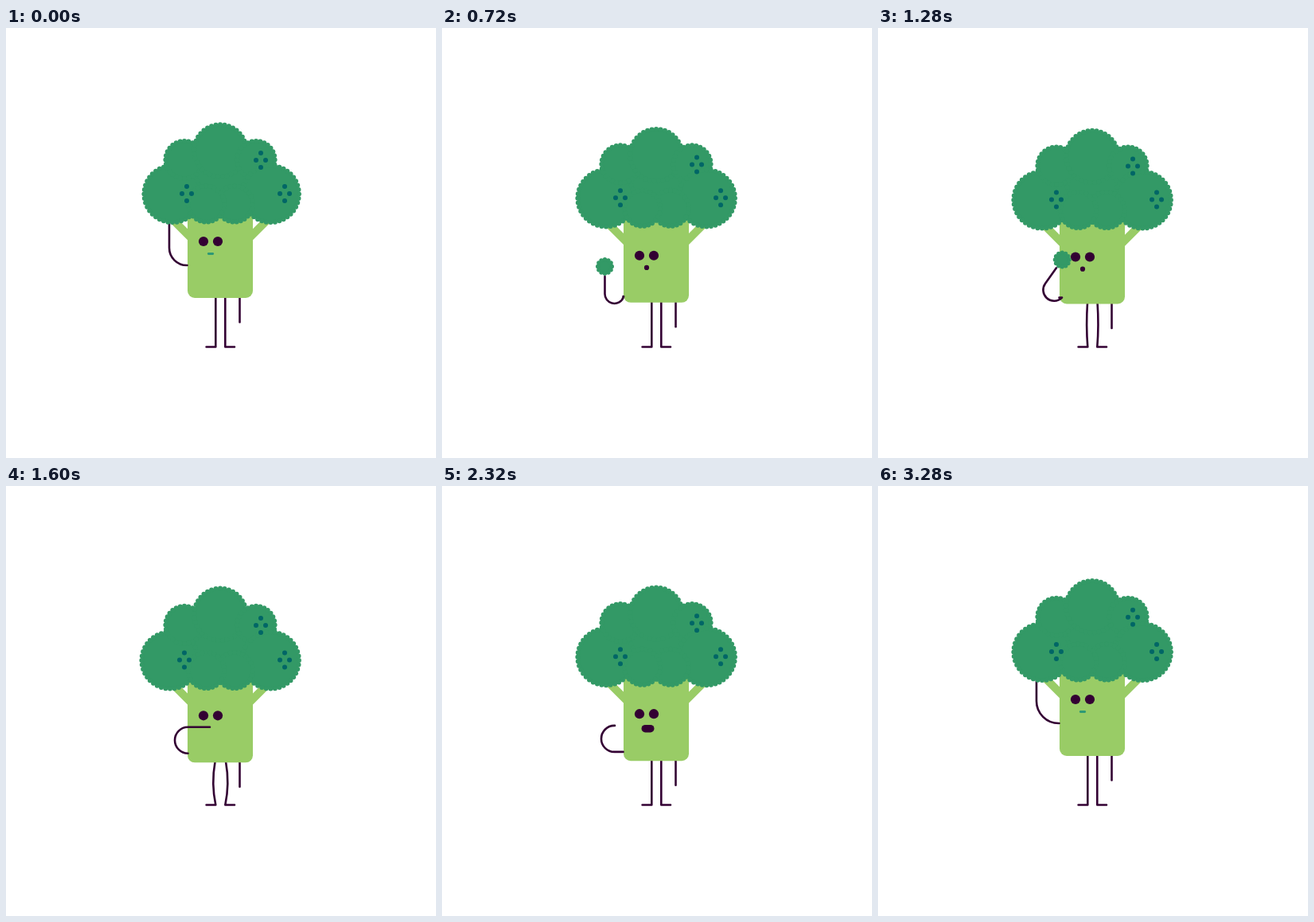
Write an HTML page with a canvas that moves like this. It is 540 by 540 pixels and loops after 3.36 s.

```html
<!DOCTYPE html>
<html lang="en">
<head>
<meta charset="utf-8">
<title>Broccoli</title>
<style>
  html, body { margin: 0; width: 100%; height: 100%; overflow: hidden; background: #fff; }
  canvas { display: block; width: 540px; height: 540px; }
</style>
</head>
<body>
<canvas id="stage" width="540" height="540"></canvas>
<script>
const ctx = document.getElementById('stage').getContext('2d');
const LOOP = 3360, STEP = 80;
const INK = '#330033', LEAF = '#339966', STEM = '#99cc66', DOT = '#006666', LIP = '#2e9975';

// Moments of the story, in steps
const PLUCK = 6, RAISE = 13, BITE = 20, CHEW = 25, DONE = 35, RISE = 36, UP = 39;
const SQUAT = 6.2;

// How strongly each part reacts to landings, the hop and the final rise
const TRUNK = { kick: 2.9, lag: 0, leap: 6, over: 0, span: 4 };
const SIDES = { kick: 6, lag: 0, leap: 11, over: 2.5, span: 4 };
const TOP = { kick: 5, lag: 1.05, leap: 14, over: 4, span: 5 };

// Arm poses: elbow centre x, y from the stem base, radius, start and end angle, forearm
const POSES = {
  up: [227, -69, 28, 90, 180, 30],
  pluck: [219.5, -36.5, 18.3, 65, 180, 21],
  low: [216.5, -10.8, 12, 15, 180, 22],
  bite: [228.5, -28, 16.5, 90, 270, 27.5],
  rest: [216.5, -27.8, 16.5, 90, 270, 0.5]
};
const MOVES = [
  [PLUCK - 1, PLUCK, 'pluck'], [PLUCK, 9, 'low'], [RAISE, BITE, 'bite'],
  [BITE + 1, 23, 'rest'], [RISE, UP, 'up']
];

const rad = deg => deg * Math.PI / 180;
const ramp = (k, a, b) => Math.min(1, Math.max(0, (k - a) / (b - a)));
const ease = (k, a, b) => { const u = ramp(k, a, b); return u * u * (3 - 2 * u); };
const hump = (k, a, span) => Math.sin(Math.PI * ramp(k, a, a + span));

function offset(k, part) {
  if (k < PLUCK) return 0;
  let y = SQUAT * (1 - ease(k, RISE, UP)) - part.over * hump(k, UP - 2, part.span);
  if (k < RAISE || k >= BITE) {
    const u = k - (k < BITE ? PLUCK : BITE), kick = part.kick * (k < BITE ? 1 : 0.72);
    y += kick * Math.exp(-0.6 * u) * Math.cos(1.2 * (u - part.lag));
  } else {
    const swing = Math.sin(2 * Math.PI * ramp(k, RAISE, BITE));
    y += swing * (swing > 0 ? 3 : part.leap);
  }
  if (k > CHEW && k < UP - 2) y += 0.9 * (1 - Math.cos(Math.PI * (k - CHEW) / 2));
  return y;
}

function disc(x, y, r, color) {
  ctx.fillStyle = color;
  ctx.beginPath();
  ctx.arc(x, y, r, 0, 7);
  ctx.fill();
}

function line(color, width, ...pts) {
  ctx.strokeStyle = color;
  ctx.lineWidth = width;
  ctx.beginPath();
  pts.forEach(([x, y]) => ctx.lineTo(x, y));
  ctx.stroke();
}

// Round leaf with a scalloped rim
function leaf(x, y, r, bump = 3, count = Math.round(r * 1.04)) {
  disc(x, y, r - bump + 0.4, LEAF);
  for (let i = 0; i < count; i++) {
    const a = i / count * 2 * Math.PI - Math.PI / 2;
    disc(x + (r - bump) * Math.cos(a), y + (r - bump) * Math.sin(a), bump, LEAF);
  }
}

function seeds(x, y) {
  for (const [dx, dy] of [[0, -9], [-6, 0], [6, 0], [0, 9]]) disc(x + dx, y + dy, 3, DOT);
}

function legs(base, drop) {
  const bow = 1.3 * Math.max(0, drop - SQUAT) ** 2;
  for (const side of [-1, 1]) {
    const x = 269.3 + side * 6;
    ctx.strokeStyle = INK;
    ctx.lineWidth = 2.6;
    ctx.beginPath();
    ctx.moveTo(x + side * bow * 0.13, base - 1);
    ctx.quadraticCurveTo(x + side * bow, (base + 400.5) / 2, x, 400.5);
    ctx.lineTo(x + side * 11.7, 400.5);
    ctx.stroke();
  }
  line(INK, 2.6, [293.5, base], [293.5, base + 30.5]);
}

function stem(base) {
  for (const [x, dir] of [[236, -1], [302, 1]]) {
    line(STEM, 10, [x, base - 71.7], [x + dir * 32, base - 103.7]);
  }
  ctx.fillStyle = STEM;
  ctx.beginPath();
  ctx.roundRect(228, base - 125, 82, 125, [0, 0, 9, 9]);
  ctx.fill();
}

function face(k, y) {
  disc(248, y, 6.1, INK);
  disc(266, y, 6.1, INK);
  if (k < PLUCK || k >= DONE) {
    line(LIP, 2.8, [254.3, y + 15.5], [259.7, y + 15.5]);
  } else if (k < BITE) {
    disc(257, y + 15.2, 3.1 + 2 * hump(k, BITE - 4, 4), INK);
  } else if (k > BITE + 1) {
    const h = 7.5 + 2 * Math.cos(Math.PI * (k - CHEW) / 2);
    line(INK, h, [250.5 + h / 2, y + 18.5], [266.5 - h / 2, y + 18.5]);
  }
}

function arm(k, base, tug) {
  const pose = MOVES.reduce((from, [a, b, name]) => {
    const u = ease(k, a, b);
    return from.map((v, i) => v + (POSES[name][i] - v) * u);
  }, POSES.up);
  const [x, cy, r0, from, to, l] = pose;
  const r = r0 - tug, y = base + cy + tug, reach = l + tug;
  const a = rad(from), b = rad(to);
  const dx = -Math.sin(b), dy = Math.cos(b);
  const hx = x + r * Math.cos(b) + dx * reach;
  const hy = y + r * Math.sin(b) + dy * reach;
  ctx.strokeStyle = INK;
  ctx.lineWidth = 2.6;
  ctx.beginPath();
  ctx.moveTo(227.5, y + r * Math.sin(a));
  ctx.arc(x, y, r, a, b);
  ctx.lineTo(hx, hy);
  ctx.stroke();
  if (k >= PLUCK && k < BITE) leaf(hx + dx * 12.5, hy + dy * 12.5, 11.5, 2.7, 12);
}

function crown(top, side, tug) {
  const mid = (top + side) / 2, lx = 206 + tug / 2;
  const lobes = [
    [lx, 208.5 + side, 38.6], [224, 165.5 + mid, 26.6], [269, 154 + top, 35.7],
    [314, 165.5 + mid, 26.6], [332.3, 208.5 + side, 38.6],
    [287, 221 + side, 25.6], [251.5, 221 + side, 25.6]
  ];
  ctx.fillStyle = LEAF;
  ctx.beginPath();
  lobes.forEach(([x, y]) => ctx.lineTo(x, y));
  ctx.fill();
  lobes.forEach(([x, y, r]) => leaf(x, y, r));
  seeds(lx + 18, 208 + side);
  seeds(320, 166 + mid);
  seeds(350, 208 + side);
}

function draw(k) {
  const drop = offset(k, TRUNK), base = 339 + drop;
  const look = 12 * ramp(k, PLUCK - 1, PLUCK + 0.7) * (1 - ease(k, RISE, UP));
  const tug = k === 0 || k === 2 ? 6 : 0;
  ctx.fillStyle = '#fff';
  ctx.fillRect(0, 0, 540, 540);
  ctx.lineCap = ctx.lineJoin = 'round';
  legs(base, drop);
  stem(base);
  face(k, 268 + drop + look);
  arm(k, base, tug);
  crown(offset(k, TOP), offset(k, SIDES), tug);
}

const start = performance.now();
function tick() {
  draw(Math.floor((performance.now() - start) % LOOP / STEP));
  requestAnimationFrame(tick);
}
tick();
</script>
</body>
</html>
```
